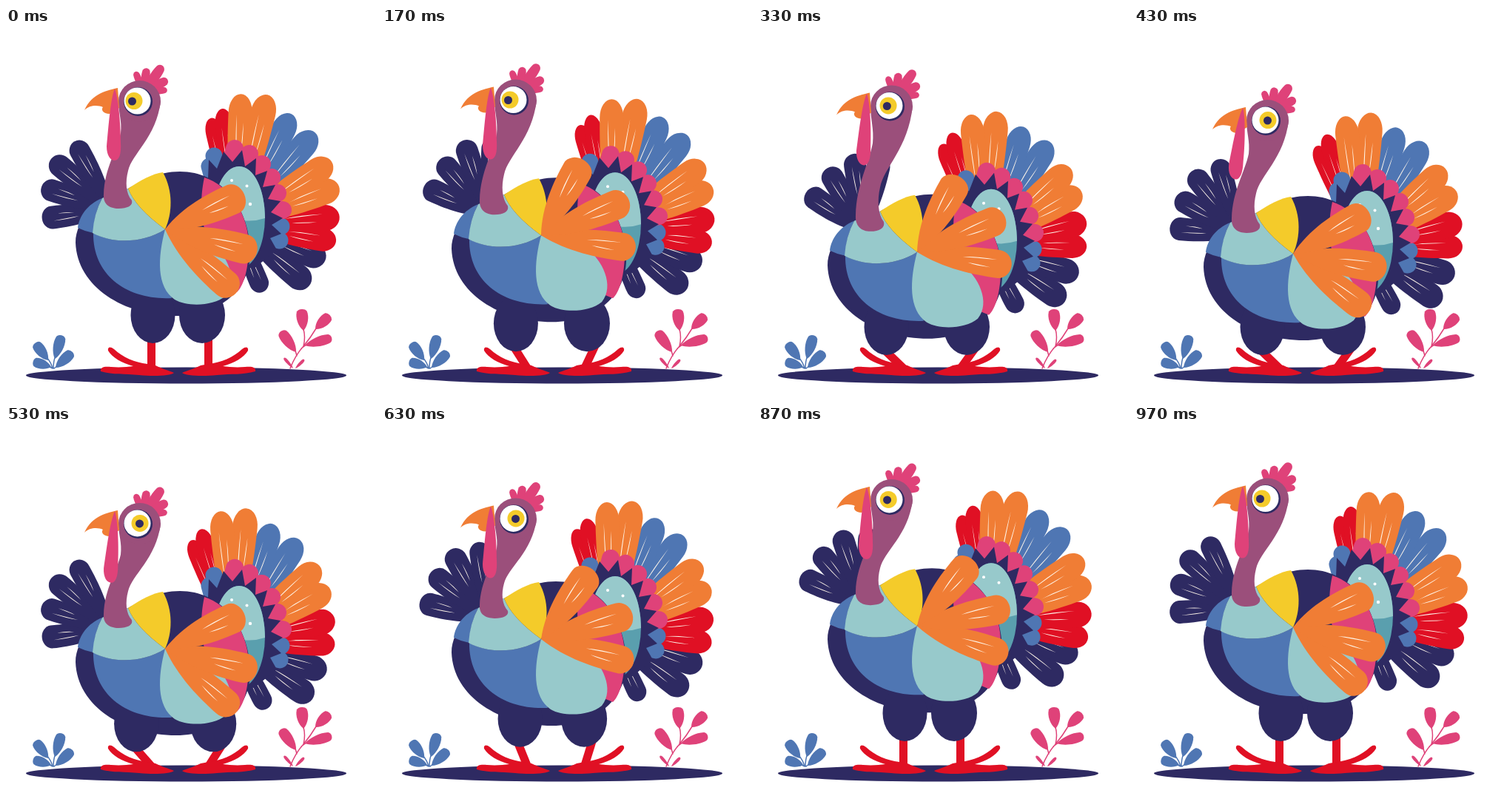
Animation, 500 px wide and 500 px high, one loop 1010 ms. Source, as an HTML page without scripts:

```html
<!DOCTYPE html>
<html lang="en">
<head>
<meta charset="utf-8">
<title>Dancing turkey</title>
<style>
/* --b body drop, --h head drop, --t tail turn, --r small feather turn,
   --l leg bend, --e eye shift, --s snood swing, --w wing lift */
@property --b { syntax: "<number>"; inherits: true; initial-value: 0 }
@property --h { syntax: "<number>"; inherits: true; initial-value: 0 }
@property --t { syntax: "<number>"; inherits: true; initial-value: 0 }
@property --r { syntax: "<number>"; inherits: true; initial-value: 0 }
@property --l { syntax: "<number>"; inherits: true; initial-value: 0 }
@property --e { syntax: "<number>"; inherits: true; initial-value: 0 }
@property --s { syntax: "<number>"; inherits: true; initial-value: 0 }
@property --w { syntax: "<number>"; inherits: true; initial-value: 0 }

html, body { margin: 0; width: 100%; height: 100%; overflow: hidden; background: #fff }
svg {
  display: block; width: 100%; height: 100%;
  animation: bob 1.01s linear infinite, flap .505s linear infinite;
}
@keyframes bob {
  0%, 3% { --b: 0; --h: 0; --t: 0; --r: 0; --l: 0; --e: 0; --s: 0 }
  10% { --b: 2; --h: -1; --t: -.5; --l: .3 }
  16.8% { --b: 8; --h: -1.5; --t: -2; --r: -1.5; --l: .7 }
  26.7% { --b: 25; --h: -1; --t: -6.9; --l: 1; --e: 0; --s: 0 }
  34% { --b: 32; --h: 8; --t: -9 }
  42.6% { --b: 33; --h: 26; --t: -9.3; --l: 1; --e: 1; --s: 6 }
  52.5% { --b: 29; --h: 33; --t: -8; --l: .9; --s: 3 }
  62.4% { --b: 16; --h: 26.5; --t: -4; --r: -1.5; --l: .48; --s: 0 }
  76.2% { --b: -1; --h: 6; --t: 0; --r: -2; --l: 0; --e: 1 }
  88% { --b: -2; --h: 0; --e: .3 }
  96%, 100% { --b: 0; --h: -.5; --t: 0; --r: 0; --l: 0; --e: 0; --s: 0 }
}
@keyframes flap {
  0%, 5% { --w: 0 }
  25% { --w: .6 }
  34% { --w: .74 }
  52% { --w: 1 }
  58% { --w: .95 }
  70% { --w: .6 }
  85% { --w: .1 }
  92%, 100% { --w: 0 }
}
.body { transform: translateY(calc(var(--b) * 1px)) }
.fan {
  transform-origin: 310px 290px;
  transform: translateY(calc(var(--b) * var(--drop) * 1px)) rotate(calc(var(--t) * var(--turn) * 1deg));
}
.small { transform: rotate(calc(var(--r) * 1deg)) }
.lift { transform: rotate(calc(var(--w) * var(--a) * 1deg)) }
.back { animation: flap .505s linear -.48s infinite }
.thigh { transform: translate(calc(var(--l) * var(--x) * 1px), calc(var(--l) * 16px)) }
.leg { transform: rotate(calc(var(--l) * var(--a) * 1deg)) }
.neck { transform-origin: 0 99px; transform: translateY(calc(var(--h) * 1px)) scaleY(calc(1 + (var(--b) - var(--h)) / 145)) }
.head { transform: translateY(calc(var(--h) * 1px)) }
.iris { transform: translateX(calc(var(--e) * 8px)) }
.pupil { transform: translateX(calc(var(--e) * 2px)) }
.snood { transform-origin: 147px 84px; transform: rotate(calc(var(--s) * 1deg)) }

.navy { fill: #2e2a62 }
.blue { fill: #4f76b3 }
.teal { fill: #97c9cb }
.pink { fill: #df4279 }
.orange { fill: #f07d35 }
.red { fill: #e01024 }
.yellow { fill: #f4cb2a }
.purple { fill: #9b4f7b }
.line { fill: none; stroke-linecap: round; stroke-linejoin: round }
</style>
</head>
<body>
<svg viewBox="0 0 500 500">
  <defs>
    <path id="leaf" d="M0 0C-9 -20 -13 -60 -9 -85A10 16 0 0 1 9 -85C13 -60 9 -20 0 0Z"/>
    <g id="feather">
      <path d="M0 0C-9 -30 -10 -62 -10 -86A10 14 0 0 1 10 -86C10 -62 9 -30 0 0Z"/>
      <path fill="#fff6ea" d="M-1.500 -48Q-3.300 -62 -3 -84Q-2 -62 -1.500 -48ZM2 -54Q2.300 -64 3 -78Q3.500 -64 2 -54Z"/>
    </g>
    <path id="foot" d="M128 464C127 458 133 457 142 458C154 459 164 458 172 457C157 453 143 445 138 436C137 431 141 430 146 434C158 445 174 452 191 454L202 456C210 460 220 463 227 466C222 470 200 471 180 469C160 467 145 469 128 464Z"/>
  </defs>

  <ellipse class="navy" cx="243.500" cy="469.500" rx="216.500" ry="11"/>

  <g class="blue">
    <path class="line" stroke="#4f76b3" stroke-width="1.500" d="M64 460Q64 450 67 443M63 460Q61 452 55 445M63 460L57 457M65 460L70 456"/>
    <use href="#leaf" transform="translate(66 447) rotate(16) scale(.7 .35)"/>
    <use href="#leaf" transform="translate(57 449) rotate(-37) scale(.7 .31)"/>
    <use href="#leaf" transform="translate(61 458) rotate(-73) scale(.65 .27)"/>
    <use href="#leaf" transform="translate(67 459) rotate(47) scale(.7 .33)"/>
  </g>
  <g class="pink">
    <path class="line" stroke="#df4279" stroke-width="1.500" d="M384 460Q391 442 402 430Q412 418 419 406M402 430Q405 418 402 407M393 443L391 436M399 433L406 428"/>
    <use href="#leaf" transform="translate(402 409) rotate(-5) scale(.75 .31)"/>
    <use href="#leaf" transform="translate(418 407) rotate(46) scale(.7 .29)"/>
    <use href="#leaf" transform="translate(392 438) rotate(-36) scale(.7 .37)"/>
    <use href="#leaf" transform="translate(404 429) rotate(74) scale(.65 .4)"/>
    <use href="#leaf" transform="translate(388 460) rotate(-41) scale(.2 .2)"/>
    <use href="#leaf" transform="translate(391 460) rotate(45) scale(.2 .18)"/>
  </g>

  <g class="fan" style="--drop:1;--turn:.6">
    <g class="navy" transform="translate(310 265)">
      <use href="#feather" transform="rotate(158) scale(1.300 .99)"/>
      <use href="#feather" transform="rotate(130) scale(1.700 1.300)"/>
      <use href="#feather" transform="rotate(112) scale(1.700 1.310)"/>
    </g>
  </g>
  <g class="fan" style="--drop:.87;--turn:1">
    <g transform="translate(310 265)">
      <g class="red small">
        <use href="#feather" transform="rotate(-13) scale(1.150 1.470)"/>
        <use href="#feather" transform="rotate(-6.500) scale(1.200 1.570)"/>
      </g>
      <g class="red">
        <use href="#feather" transform="rotate(100) scale(1.600 1.380)"/>
        <use href="#feather" transform="rotate(86) scale(1.750 1.410)"/>
      </g>
      <g class="blue">
        <use href="#feather" transform="rotate(41) scale(1.700 1.640)"/>
        <use href="#feather" transform="rotate(27) scale(1.650 1.670)"/>
      </g>
      <g class="orange">
        <use href="#feather" transform="rotate(70) scale(1.750 1.490)"/>
        <use href="#feather" transform="rotate(57) scale(1.750 1.550)"/>
        <use href="#feather" transform="rotate(14) scale(1.700 1.800)"/>
        <use href="#feather" transform="rotate(2.500) scale(1.600 1.760)"/>
      </g>
    </g>
  </g>

  <g class="body">
    <path class="line" stroke="#4f76b3" stroke-width="23" d="M285 192L281 173M280 205L275 187M352 265L372 268M350 282L370 287"/>
    <path class="line" stroke="#df4279" stroke-width="24" d="M304 182L309 163M322 186L329 170M336 198L346 184M346 214L359 202M354 230L367 223M358 248L374 246"/>
    <path class="navy" d="M272 230L274 178L285 190L294 167L306 181L319 165L323 187L338 176L337 199L353 193L347 215L364 212L354 231L371 234L358 249L374 257L359 266L372 278L357 284L366 300L335 325L300 320Z"/>
    <ellipse cx="315" cy="256" rx="35" ry="69" fill="#5a9fae"/>
    <path class="teal" d="M280 264C279 220 294 187 315 187C336 187 350 220 350 257Q335 262 320 260Q300 260 280 264Z"/>
    <g fill="#fff">
      <circle cx="305" cy="206" r="2"/>
      <circle cx="325.500" cy="213.500" r="2"/>
      <circle cx="330" cy="238" r="2.200"/>
    </g>

    <g transform="translate(144 246)">
      <g class="back">
        <g class="lift navy" style="--a:48">
          <use href="#feather" transform="rotate(-97) scale(1.550 .96)"/>
          <use href="#feather" transform="rotate(-72) scale(1.500 1.010)"/>
          <use href="#feather" transform="rotate(-50) scale(1.500 1.080)"/>
          <use href="#feather" transform="rotate(-29) scale(1.400 1.060)"/>
        </g>
      </g>
    </g>
    <path class="navy" d="M235 194C205 194 183 207 165 217C125 228 94 258 94 290C96 350 160 389 230 389C290 389 332 352 330 300C328 240 290 194 235 194Z"/>
  </g>

  <g class="red">
    <g transform="translate(196 460)"><rect class="leg" style="--a:-46" x="-5" y="-42" width="11" height="44"/></g>
    <g transform="translate(273 460)"><rect class="leg" style="--a:36" x="-5" y="-42" width="11" height="44"/></g>
    <use href="#foot"/>
    <use href="#foot" transform="matrix(-1 0 0 1 465 0)"/>
  </g>
  <g class="navy">
    <ellipse class="thigh" style="--x:-25" cx="198.500" cy="388" rx="30" ry="38"/>
    <ellipse class="thigh" style="--x:17" cx="265" cy="388" rx="31" ry="38"/>
  </g>

  <g class="body">
    <path class="blue" d="M130 230C110 238 99 254 97 270Q107 275 118 277Q119 250 130 230Z"/>
    <path class="blue" d="M118 277C145 292 185 291 215 272C214 300 215 340 224 365C165 368 117 335 118 277Z"/>
    <path class="teal" d="M130 230C145 222 158 219 165 217Q175 243 215 272C185 291 145 292 117 277Q119 250 130 230Z"/>
    <path class="yellow" d="M165 217C183 205 198 197 212 195C226 220 225 250 215 272Q175 243 165 217Z"/>
    <path class="pink" d="M268 202C300 212 330 250 328 300C327 330 320 350 312 357L295 350C305 320 290 300 275 290C262 262 262 230 268 202Z"/>
    <path class="teal" d="M215 272C205 310 203 350 228 367C245 377 280 376 297 362C315 340 298 305 275 288C250 280 230 276 215 272Z"/>
  </g>

  <path class="neck purple" d="M152 99C152 115 157 125 155 142C150 165 133 190 132 225C131 238 140 244 152 244C164 244 172 240 170 233C162 224 161 208 165 193C170 170 203 148 209 99Z"/>

  <g class="body">
    <g class="orange" transform="translate(215 272)">
      <g class="lift" style="--a:-46"><use href="#feather" transform="rotate(132) scale(1.900 1.290)"/></g>
      <g class="lift" style="--a:-49"><use href="#feather" transform="rotate(104) scale(2 1.280)"/></g>
      <g class="lift" style="--a:-50"><use href="#feather" transform="rotate(66) scale(2.050 1.170)"/></g>
    </g>
  </g>

  <g class="head">
    <g class="pink" transform="translate(186 87)">
      <use href="#leaf" transform="rotate(-22) scale(.45 .32)"/>
      <use href="#leaf" transform="rotate(7) scale(.55 .35)"/>
      <use href="#leaf" transform="rotate(35) scale(.65 .47)"/>
      <use href="#leaf" transform="rotate(62) scale(.6 .39)"/>
      <use href="#leaf" transform="rotate(84) scale(.45 .34)"/>
    </g>
    <ellipse class="purple" cx="180.500" cy="99" rx="28.500" ry="28"/>
    <path class="orange" d="M151 81C138 84 116 88 106 111C113 104 124 104 131 107C128 110 131 116 140 116L153 108Z"/>
    <path class="snood pink" d="M147 82C141 95 138 140 136 160C136 172 141 179 147 179C153 179 156 170 155 155C155 130 152 95 147 82Z"/>
    <circle class="navy" cx="178.500" cy="99.500" r="19.500"/>
    <circle cx="177.500" cy="98.500" r="18" fill="#fff"/>
    <g class="iris">
      <circle class="yellow" cx="173" cy="98.500" r="11.500"/>
      <circle class="pupil navy" cx="170.500" cy="99" r="5.500"/>
    </g>
  </g>
</svg>
</body>
</html>
```
